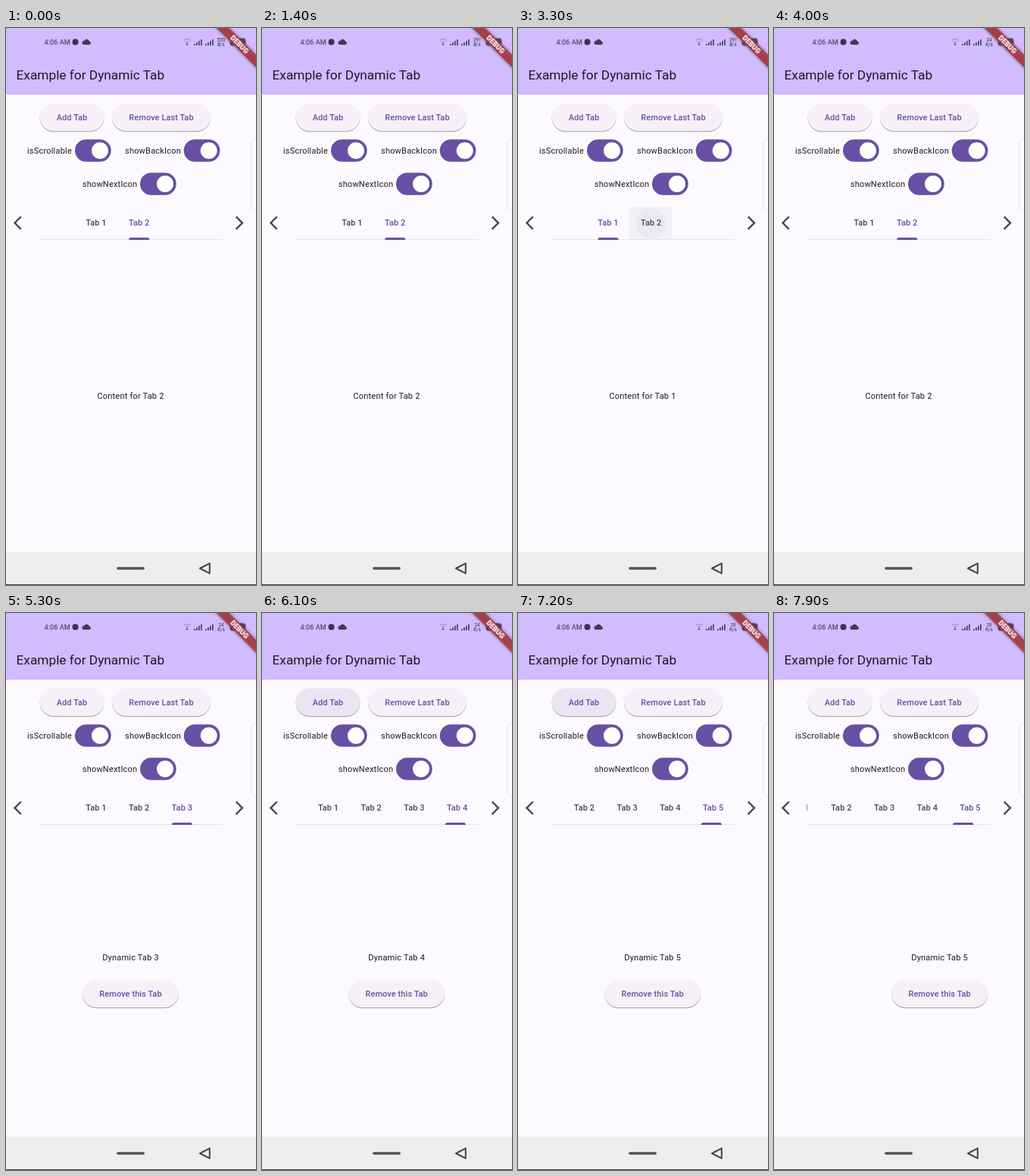
An HTML page for the animation above (8000 ms loop, 330 px wide and 736 px high).

```html
<!DOCTYPE html>
<html lang="en">
<head>
<meta charset="utf-8">
<title>Dynamic tabs</title>
<style>
  html, body { margin: 0; width: 100%; height: 100%; overflow: hidden; background: #fdfaff; }
  svg { display: block; width: 330px; height: 736px; }
  text { font: 11px Roboto, sans-serif; letter-spacing: .2px; fill: #1d1b20; }
  .mid { text-anchor: middle; }
  .label { font-weight: 500; letter-spacing: .08px; text-anchor: middle; }
  .button rect { fill: #f6f1f9; filter: drop-shadow(0 1px .7px rgba(0, 0, 0, .38)); }
  .button text, .purple { fill: #6750a4; }
  .title { font-size: 17.3px; letter-spacing: 0; }
  .status text { font-weight: 500; letter-spacing: 0; fill: #554b6b; }
  .status .net { font-size: 6.3px; }
  .banner { filter: drop-shadow(0 0 2.2px rgba(0, 0, 0, .5)); }
  .banner text { font-size: 9.3px; font-weight: 900; letter-spacing: 0; fill: #fff; }
  .line { fill: none; stroke: #46424c; stroke-width: 2.3; }
</style>
</head>
<body>
<svg viewBox="0 0 330 736">
  <defs>
    <clipPath id="strip"><rect x="43" y="236" width="243" height="44"/></clipPath>
    <clipPath id="pressClip"><rect id="pressArea"/></clipPath>
  </defs>
  <rect width="330" height="736" fill="#fdfaff"/>
  <rect width="330" height="88" fill="#d0bcff"/>
  <text class="title" x="13.5" y="68">Example for Dynamic Tab</text>

  <g class="status" fill="#554b6b">
    <text x="50.5" y="22" style="font-size:9.1px">4:06 AM</text>
    <circle cx="91.5" cy="18.5" r="4" fill="#3b3350"/>
    <path d="M103 22a2.6 2.6 0 0 1 .2-5.2a3.7 3.7 0 0 1 6.8 .7a2.3 2.3 0 0 1 .2 4.5z" fill="#443a58"/>
    <path d="M234.5 16.5q4.5-3.5 9 0M236.3 18.8q2.7-2 5.4 0" fill="none" stroke="#9585b8"/>
    <circle cx="239" cy="21.3" r="1.2"/>
    <g id="signals"></g>
    <text id="rate" class="net mid" x="284" y="18"></text>
    <text id="unit" class="net mid" x="284" y="24"></text>
    <rect x="295.5" y="13.5" width="21" height="10" rx="3.5"/>
  </g>
  <g class="banner" transform="translate(330 0) rotate(45)">
    <rect x="-42" y="25.2" width="84" height="11.5" fill="#a5404b"/>
    <text class="mid" y="33.8">DEBUG</text>
  </g>

  <g id="controls"></g>
  <rect x="323.5" y="146" width="20" height="96" rx="8" fill="#fffdff" stroke="#e9deeb"/>

  <path class="line" d="M19.8 249.3L11.5 257.6L19.8 265.9M303.7 249.3L312 257.6L303.7 265.9"/>
  <rect x="43" y="279" width="243" height="1" fill="#e5dfea"/>
  <g clip-path="url(#strip)">
    <g id="tabs">
      <path id="indicator" class="purple" d="M-13.5 280v-.5q0-2.5 2.5-2.5h22q2.5 0 2.5 2.5v.5z"/>
    </g>
  </g>
  <g id="pages"></g>

  <g id="press" clip-path="url(#pressClip)" fill="#6750a4">
    <rect width="330" height="736" opacity=".06"/>
    <circle id="ripple" opacity=".06"/>
  </g>

  <rect y="692" width="330" height="44" fill="#eee"/>
  <rect y="735" width="330" height="1" fill="#444"/>
  <rect x="146" y="712.2" width="37" height="3.6" rx="1.8" fill="#555"/>
  <path class="line" style="stroke-width:2" stroke-linejoin="round" d="M268.8 707.3V720.7L256 714z"/>
</svg>
<script>
const LOOP = 8000, TICK = 100, WIDTH = 330, TAB = 56.7, FIRST = 119;
const SCROLL = [0, 0, 0, 31.5, 88.3];   // strip offset with each tab selected
const $ = id => document.getElementById(id);
const add = (id, markup) => $(id).insertAdjacentHTML('beforeend', markup);

const button = (x, y, w, label) => `<g class="button">
  <rect x="${x}" y="${y}" width="${w}" height="36.7" rx="18.35"/>
  <text class="label" x="${x + w / 2}" y="${y + 22.5}">${label}</text></g>`;
const toggle = (x, y, labelX, label) => `<text x="${labelX}" y="${y + 4}">${label}</text>
  <rect class="purple" x="${x}" y="${y - 14.7}" width="47.7" height="29.4" rx="14.7"/>
  <circle cx="${x + 33}" cy="${y}" r="11" fill="#fff"/>`;

add('controls', button(44.5, 99.5, 85, 'Add Tab') + button(140, 99.5, 130, 'Remove Last Tab') +
  toggle(91, 162, 28, 'isScrollable') + toggle(234.7, 162, 157, 'showBackIcon') +
  toggle(177, 206, 100.8, 'showNextIcon'));

for (const x of [248, 263])
  for (let i = 0; i < 4; i++)
    add('signals', `<rect x="${x + i * 3}" y="${21 - i * 2}" width="1.8" height="${2 + i * 2}"/>`);

for (let i = 0; i < 5; i++) {
  const n = i + 1, x = i * WIDTH + 164.5;
  add('tabs', `<text class="label" x="${FIRST + i * TAB}" y="261">Tab ${n}</text>`);
  add('pages', i < 2
    ? `<text class="mid" x="${x}" y="490">Content for Tab ${n}</text>`
    : `<text class="mid" x="${x}" y="459">Dynamic Tab ${n}</text>` + button(x - 63.5, 484.5, 127, 'Remove this Tab'));
}
const labels = document.querySelectorAll('#tabs text');

// Each slide runs through its steps, one per tick, then rests on its tab.
const slides = [
  { at: 2500, to: 0, steps: [.74, .74, .957] },
  { at: 3500, to: 1, steps: [.72, .96] },
  { at: 5000, to: 2, steps: [.72, .96] },
  { at: 6000, to: 3, steps: [.72, .96] },
  { at: 7100, to: 4, steps: [.72, .96] },
  { at: 7900, to: 3, steps: [.164] },   // start of a swipe back
];
const addButton = { x: 44.5, y: 99.5, w: 85, h: 36.7, r: 18.35, cx: 81, cy: 127 };
const tabArea = i => ({ x: FIRST + (i - .5) * TAB, y: 236, w: TAB, h: 43, r: 0, cx: FIRST + i * TAB, cy: 258 });
const presses = [
  { at: 2200, ...tabArea(0) }, { at: 3200, ...tabArea(1) },
  ...[4700, 5700, 6800].map(at => ({ at, ...addButton })),
];
const rates = [[0, '553', 'B/s'], [900, '291', 'B/s'], [3900, '24', 'K/s'], [6900, '26', 'K/s']];

function setAttrs(id, attrs) {
  for (const key in attrs) $(id).setAttribute(key, attrs[key]);
}

function drawTabs(t) {
  let pos = 1, count = 2;
  for (const { at, to, steps } of slides) {
    if (t < at) break;
    pos += (to - pos) * (steps[(t - at) / TICK] ?? 1);
    count = Math.max(count, to + 1);
  }
  const i = Math.floor(pos), f = pos - i;
  const scroll = SCROLL[i] + ((SCROLL[i + 1] ?? 0) - SCROLL[i]) * (1 - (1 - f) ** 2);
  setAttrs('tabs', { transform: `translate(${-scroll})` });
  setAttrs('indicator', { transform: `translate(${FIRST + pos * TAB})` });
  setAttrs('pages', { transform: `translate(${-pos * WIDTH})` });
  labels.forEach((label, n) => {
    const active = Math.max(0, 1 - Math.abs(n - pos));
    label.style.fill = `color-mix(in srgb, #6750a4 ${active * 100}%, #49454f)`;
    label.style.display = n < count ? '' : 'none';
  });
}

function drawPress(t) {
  const p = presses.find(({ at }) => t >= at && t < at + 600);
  $('press').style.display = p ? '' : 'none';
  if (!p) return;
  const age = t - p.at;
  setAttrs('pressArea', { x: p.x, y: p.y, width: p.w, height: p.h, rx: p.r });
  setAttrs('ripple', { cx: p.cx, cy: p.cy, r: 6 + age * .14 });
  setAttrs('press', { opacity: Math.min(1, (600 - age) / 300) });
}

function frame() {
  const t = Math.floor(performance.now() % LOOP / TICK) * TICK;
  drawTabs(t);
  drawPress(t);
  const [, rate, unit] = rates.findLast(([at]) => t >= at);
  $('rate').textContent = rate;
  $('unit').textContent = unit;
  requestAnimationFrame(frame);
}
frame();
</script>
</body>
</html>
```
